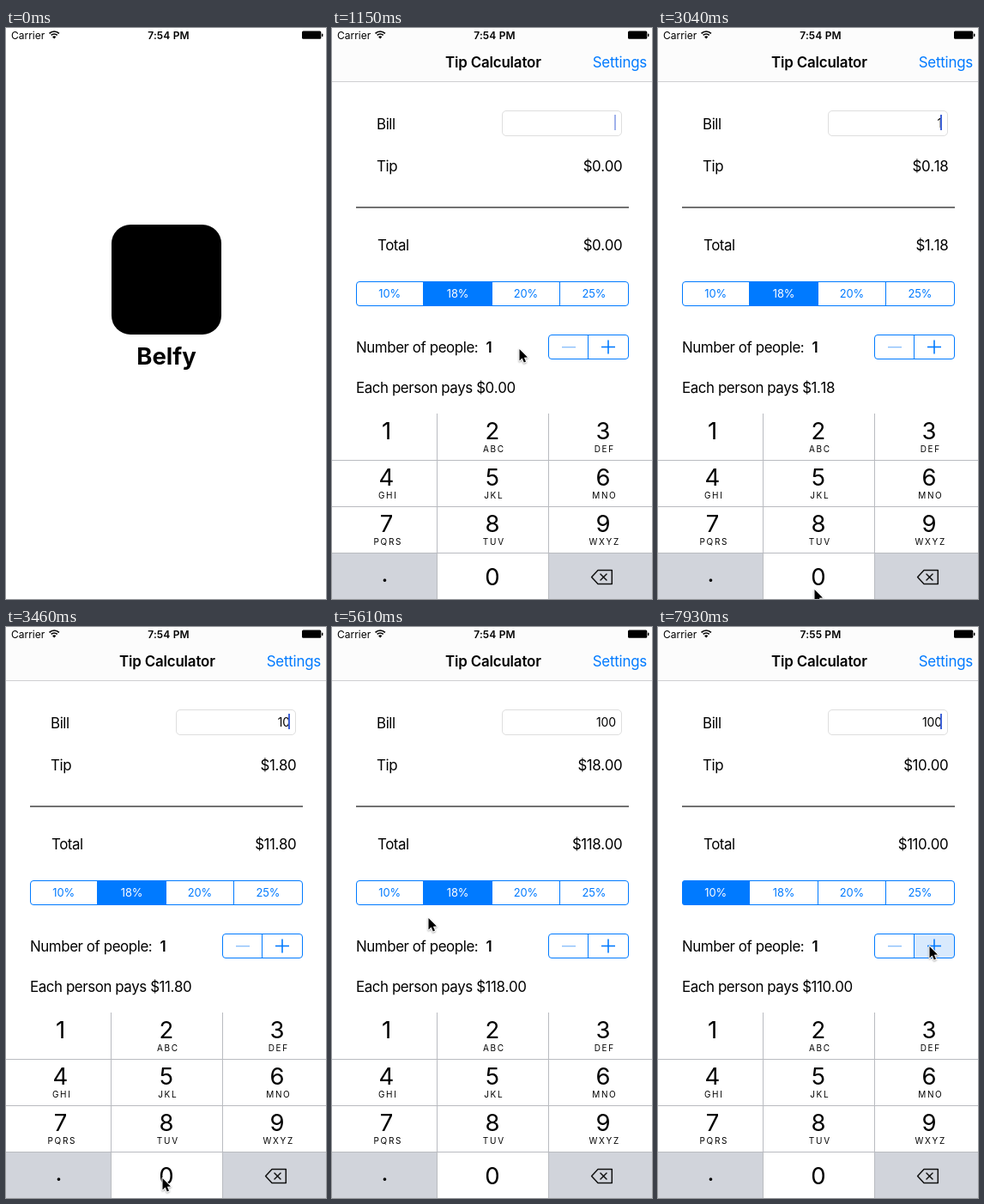
An HTML page with a canvas that plays this animation: 373x665 px, repeating every 8 s.

```html
<!DOCTYPE html>
<html lang="en">
<head>
<meta charset="utf-8">
<title>Tip Calculator</title>
<style>
  html, body { margin: 0; width: 100%; height: 100%; overflow: hidden; background: #fff; }
  canvas { display: block; width: 373px; height: 665px; }
</style>
</head>
<body>
<canvas id="stage"></canvas>
<script>
const W = 373, H = 665, LOOP = 8000;
const BLUE = '#007aff', KEY_GREY = '#d1d4db', GRID = '#b9bbc0';
const FONT = 'Inter, "Liberation Sans", sans-serif';
const ratio = window.devicePixelRatio || 1;

// keypad
const KEY_TOP = 449, KEY_H = 54;
const LETTERS = ' ABC DEF GHI JKL MNO PQRS TUV WXYZ'.split(' ');
const MIDDLES = [63.5, 187, 316];
const colLeft = c => Math.max(0, 130 * c - 7);

// what the user does
const BILL = '100', RATES = [10, 18, 20, 25];
const TAPS = [2570, 3190, 3690], HOLD = 210;
const PICK_RATE = 6440, PRESS_PLUS = 7830, NEXT_MINUTE = 7600;
const REST = { x: 218, y: 373, from: 900 };
const MOVES = [
  { from: 1390, to: 2330, x: 98, y: 473 },
  { from: 2740, to: 3040, x: 182, y: 653 },
  { from: 3190, to: 3250, x: 182, y: 641 },
  { from: 4260, to: 4500, x: 204, y: 332 },
  { from: 4790, to: 5610, x: 112, y: 338 },
  { from: 5790, to: 5970, x: 77, y: 313 },
  { from: 6500, to: 6930, x: 234, y: 300 },
  { from: 6990, to: 7070, x: 234, y: 309 },
  { from: 7280, to: 7720, x: 316, y: 371 }
];

function layer(canvas) {
  canvas.width = Math.round(W * ratio);
  canvas.height = Math.round(H * ratio);
  const c = canvas.getContext('2d');
  c.scale(ratio, ratio);
  return c;
}

const stage = layer(document.getElementById('stage'));
const splash = layer(document.createElement('canvas'));
let g = stage;

const clamp = v => Math.max(0, Math.min(1, v));
const progress = (t, from, to) => clamp((t - from) / (to - from));
const smooth = p => p * p * (3 - 2 * p);
const money = v => '$' + v.toFixed(2);

function text(s, x, y, o = {}) {
  const { size = 16.9, weight = 400, color = '#000', align = 'left', track = -0.42 } = o;
  g.font = `${weight} ${size}px ${FONT}`;
  g.letterSpacing = track + 'px';
  g.fontKerning = s.includes('$') ? 'none' : 'normal';
  g.textAlign = align;
  g.fillStyle = color;
  g.fillText(s, x, y);
}

function rect(x, y, w, h, color) {
  g.fillStyle = color;
  g.fillRect(x, y, w, h);
}

function box(x, y, w, h, r) {
  g.beginPath();
  g.roundRect(x, y, w, h, r);
}

function outline(x, y, w, h, r, color) {
  box(x, y, w, h, r);
  g.strokeStyle = color;
  g.lineWidth = 1;
  g.stroke();
}

function line(x1, y1, x2, y2, color, width) {
  g.strokeStyle = color;
  g.lineWidth = width;
  g.beginPath();
  g.moveTo(x1, y1);
  g.lineTo(x2, y2);
  g.stroke();
}

function polygon(points) {
  g.beginPath();
  points.forEach(([x, y]) => g.lineTo(x, y));
  g.closePath();
}

function statusBar(clock) {
  text('Carrier', 6, 12.5, { size: 12, track: 0 });
  text(clock, 189.5, 12.5, { size: 12, weight: 600, align: 'center', track: 0.15 });
  g.strokeStyle = g.fillStyle = '#000';
  g.lineWidth = 1.7;
  for (const r of [5, 8]) {
    g.beginPath();
    g.arc(56.2, 12, r, -Math.PI * 0.75, -Math.PI * 0.25);
    g.stroke();
  }
  g.beginPath();
  g.moveTo(56.2, 12.4);
  g.arc(56.2, 12.4, 3, -Math.PI * 0.75, -Math.PI * 0.25);
  g.fill();
  box(345, 3.5, 22.3, 9.3, 1.5);
  g.fill();
  box(368, 6.5, 1.4, 3.6, 0.7);
  g.fill();
}

// one-second blink; the first key press restarts its phase
function caretAlpha(t) {
  const [first] = TAPS, last = TAPS[TAPS.length - 1];
  if (t >= first && t < last + HOLD) return 1;
  const p = (t < first ? t + 210 : t) % 1000;
  return p < 500 ? 1 - progress(p, 270, 450) : progress(p, 790, 930);
}

function stateAt(t) {
  const typed = TAPS.filter(tap => t >= tap + HOLD).length;
  const pressing = t >= TAPS[typed];
  return {
    bill: BILL.slice(0, typed),
    key: pressing ? BILL[typed] : null,
    seg: t < PICK_RATE ? 1 : 0,
    segDown: t >= PICK_RATE - 100 && t < PICK_RATE,
    plusDown: t >= PRESS_PLUS,
    clock: t < NEXT_MINUTE ? '7:54 PM' : '7:55 PM'
  };
}

function navBar() {
  rect(0, 0, W, 62, '#fcfcfc');
  rect(0, 62, W, 1, '#cfcfd1');
  text('Tip Calculator', 187.8, 46, { weight: 600, align: 'center', track: -0.16 });
  text('Settings', 367, 46, { color: BLUE, align: 'right', track: -0.22 });
}

function form(t, s) {
  const tip = s.bill * RATES[s.seg] / 100;
  const total = money(+s.bill + tip);
  const amount = (v, y) => text(v, 338.2, y, { align: 'right' });

  text('Bill', 52, 118);
  outline(198.5, 96.5, 139, 29, 4.5, '#dedede');
  text(s.bill, 331, 116, { size: 14, align: 'right', track: -0.1 });
  g.globalAlpha = caretAlpha(t);
  rect(329, 101, 2, 18, '#3f62d6');
  g.globalAlpha = 1;

  text('Tip', 52, 166.5);
  amount(money(tip), 166.5);
  rect(28, 208.2, 318, 1.5, '#444');
  text('Total', 53, 258.5);
  amount(total, 258.5);

  text('Number of people:', 28, 377.5);
  text('1', 183, 377.5, { weight: 600, align: 'center', track: 0 });
  text('Each person pays ' + total, 28, 424.5);
}

function segments(s) {
  const step = 79.4, edge = i => Math.floor(27.5 + step * i);
  g.save();
  box(28, 295, 318, 29, 3.5);
  g.clip();
  rect(edge(s.seg), 295, edge(s.seg + 1) - edge(s.seg) + 1, 29, BLUE);
  if (s.segDown) rect(28, 295, step, 29, 'rgba(0,122,255,.15)');
  g.restore();
  outline(28.5, 295.5, 317, 28, 3.5, BLUE);
  RATES.forEach((rate, i) => {
    if (i) rect(edge(i), 295, 1, 29, BLUE);
    text(rate + '%', 27.5 + step * (i + 0.5), 314, {
      size: 12.9, align: 'center', track: -0.1, color: i === s.seg ? '#fff' : BLUE
    });
  });
}

function stepper(s) {
  if (s.plusDown) rect(299, 358, 46, 27, '#d9eafd');
  outline(252.5, 357.5, 93, 28, 3.5, BLUE);
  rect(298, 357, 1, 29, BLUE);
  line(268, 371.7, 284, 371.7, '#8cc0fb', 1.4);
  line(314, 371.5, 330, 371.5, BLUE, 1.6);
  line(322, 363.5, 322, 379.5, BLUE, 1.6);
}

function deleteIcon() {
  const y = 639.5, x = 316.5, r = 3.5;
  g.save();
  g.lineJoin = g.lineCap = 'round';
  g.strokeStyle = '#111';
  g.lineWidth = 1.5;
  polygon([[302.6, y], [310, y - 8], [326.3, y - 8], [326.3, y + 8], [310, y + 8]]);
  g.stroke();
  for (const d of [-r, r]) line(x - r, y - d, x + r, y + d, '#111', 1.5);
  g.restore();
}

function keyboard(t, s) {
  const lift = 1 - progress(t, 538, 938);
  g.save();
  g.translate(0, Math.round(216 * lift ** 3));
  rect(0, KEY_TOP, W, 216, '#fff');
  for (let i = 0; i < 12; i++) {
    const c = i % 3, row = Math.floor(i / 3), last = row === 3;
    const x = colLeft(c), y = KEY_TOP + row * KEY_H;
    const label = last ? ['.', '0', ''][c] : String(i + 1);
    const grey = last && c !== 1 || label === s.key;
    if (grey) rect(x, y + 1, colLeft(c + 1) - x, KEY_H, KEY_GREY);
    if (c) rect(x - 1, y, 1, KEY_H, GRID);
    if (row) rect(x, y, colLeft(c + 1) - x, 1, GRID);
    const drop = label === '.' ? 34 : last ? 38 : 30;
    text(label, MIDDLES[c] - (label === '.' ? 2 : 0), y - (label === '.' ? 0 : 0) + drop,
      { size: 27.5, align: 'center', track: 0 });
    text(LETTERS[i] || '', MIDDLES[c] + 1.8, y + 45, { size: 10, align: 'center', track: 1.7 });
  }
  deleteIcon();
  g.restore();
}

function pointer(t) {
  if (t < REST.from) return;
  let { x, y } = REST;
  for (const m of MOVES) {
    const p = smooth(progress(t, m.from, m.to));
    x += (m.x - x) * p;
    y += (m.y - y) * p;
  }
  g.save();
  g.translate(x, y);
  polygon([[0.5, 1], [0.5, 14.5], [3.6, 11.6], [5.8, 16.6], [8, 15.6], [5.9, 10.8], [10, 10.6]]);
  g.lineJoin = 'round';
  g.shadowColor = 'rgba(0,0,0,.35)';
  g.shadowBlur = 2 * ratio;
  g.shadowOffsetY = ratio;
  g.strokeStyle = '#fff';
  g.lineWidth = 2;
  g.stroke();
  g.shadowColor = 'transparent';
  g.fillStyle = '#000';
  g.fill();
  g.restore();
}

function paintSplash() {
  g = splash;
  rect(0, 0, W, H, '#fff');
  box(123, 229, 128, 128, 22);
  g.fillStyle = '#000';
  g.fill();
  text('Belfy', 187, 392, { size: 27.5, weight: 700, align: 'center', track: 0 });
  statusBar('7:54 PM');
  g = stage;
}

function draw(t) {
  const s = stateAt(t);
  rect(0, 0, W, H, '#fff');
  navBar();
  form(t, s);
  segments(s);
  stepper(s);
  keyboard(t, s);
  statusBar(s.clock);
  g.globalAlpha = t < 570 ? 1 : 1 - progress(t, 520, 780);
  g.drawImage(splash.canvas, 0, 0, W, H);
  g.globalAlpha = 1;
  pointer(t);
}

paintSplash();
const start = performance.now();
function tick() {
  draw((performance.now() - start) % LOOP);
  requestAnimationFrame(tick);
}
tick();
</script>
</body>
</html>
```
